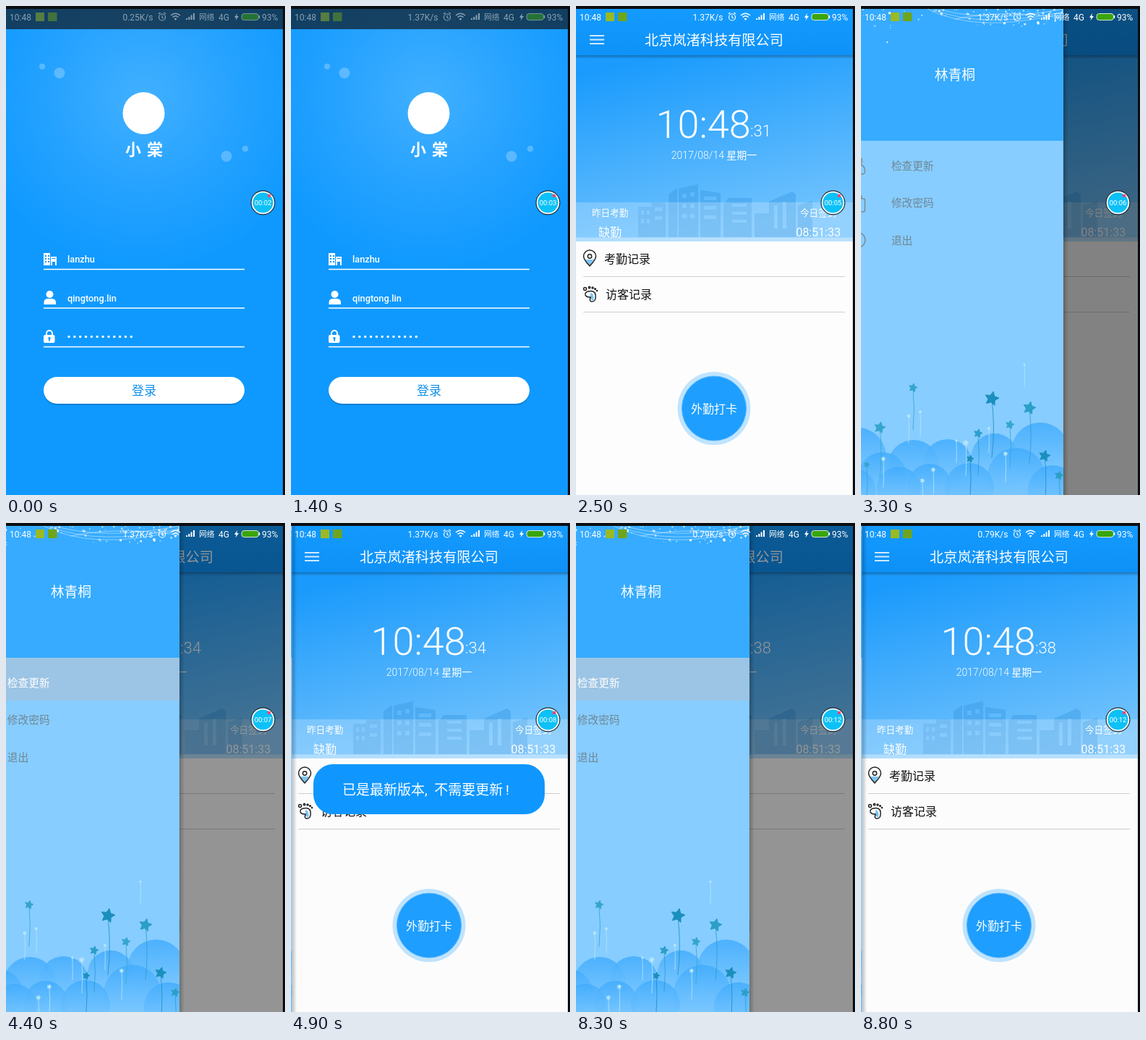
An HTML page that plays this animation: 386 by 675 pixels, repeating every 8.9 s.

```html
<!DOCTYPE html>
<html lang="zh-CN">
<head>
<meta charset="utf-8">
<title>考勤</title>
<style>
html, body { margin: 0; width: 100%; height: 100%; overflow: hidden; background: #0b0d10; }
svg { display: block; width: 386px; height: 675px; font-family: Roboto, "Noto Sans CJK SC", "Noto Sans CJK", sans-serif; fill: #fff; }
.mid { text-anchor: middle; }
.end { text-anchor: end; }
.line { fill: none; stroke: #fff; }
.icon { fill: none; stroke: #7b8d9b; stroke-width: 1.5; }
.dark { fill: none; stroke: #222; stroke-width: 1.5; }
</style>
</head>
<body>
<svg viewBox="0 0 386 675">
  <defs>
    <clipPath id="screen"><path d="M0 4H383V675H0z"/></clipPath>
    <clipPath id="panel"><path d="M0 0H300V675H0z"/></clipPath>
    <radialGradient id="glow" gradientUnits="userSpaceOnUse" cx="190" cy="125" r="240">
      <stop stop-color="#41b0ff"/><stop offset=".5" stop-color="#27a3ff"/><stop offset="1" stop-color="#0f99ff"/>
    </radialGradient>
    <linearGradient id="sky" gradientUnits="userSpaceOnUse" x1="150" y1="60" x2="210" y2="325">
      <stop stop-color="#1a9bfd"/><stop offset="1" stop-color="#74c4fd"/>
    </linearGradient>
    <linearGradient id="bar" x2="0" y2="1">
      <stop stop-color="#149bff"/><stop offset="1" stop-color="#0e92f8"/>
    </linearGradient>
    <linearGradient id="cloud" x2="0" y2="1">
      <stop stop-color="#42acfd"/><stop offset="1" stop-color="#82cbff"/>
    </linearGradient>
    <linearGradient id="edge">
      <stop stop-opacity=".25"/><stop offset="1" stop-opacity="0"/>
    </linearGradient>
    <linearGradient id="under" x2="0" y2="1">
      <stop stop-opacity=".28"/><stop offset="1" stop-opacity="0"/>
    </linearGradient>
  </defs>

  <g clip-path="url(#screen)">
    <g id="login">
      <path d="M0 0H383V675H0z" fill="url(#glow)"/>
      <path d="M0 4H383V32H0z" fill="#10202e" opacity=".75"/>
      <g opacity=".25">
        <circle cx="50" cy="83.5" r="4"/><circle cx="74" cy="92.5" r="7.5"/>
        <circle cx="305" cy="207.5" r="7.5"/><circle cx="331" cy="197" r="4.3"/>
      </g>
      <circle cx="190.5" cy="148" r="29"/>
      <text x="165" y="206" font-size="22" font-weight="700" letter-spacing="8">小棠</text>

      <path fill-rule="evenodd" d="M52 341h9v17h-9zM54 344v2h2v-2zM58 344v2h2v-2zM54 348v2h2v-2zM58 348v2h2v-2zM54 352v2h2v-2zM58 352v2h2v-2zM62 346h8v12h-2v-5h-4v5h-2zM63.500 348v1h5v-1z"/>
      <circle cx="60.500" cy="398" r="5"/><path d="M52.500 412v-3q0-5 6-5h4q6.500 0 6.500 5v3z"/>
      <path class="line" d="M56 455v-3a4 4 0 0 1 8 0v3" stroke-width="2"/>
      <rect x="52" y="454" width="15.500" height="11" rx="2"/>
      <path d="M60 457a1.700 1.700 0 0 1 1 3.100v2.400h-2v-2.400a1.700 1.700 0 0 1 1-3.100z" fill="#159bff"/>
      <path class="line" d="M52 363.500H330M52 417H330M52 470.500H330" stroke-width="1.300"/>
      <g font-size="12.800" font-weight="500">
        <text x="85" y="354">lanzhu</text><text x="85" y="408">qingtong.lin</text>
      </g>
      <path id="cursor" d="M85.500 341h1v17h-1z"/>
      <g id="dots"></g>
      <rect x="52" y="514" width="278" height="37" rx="18.500" fill="#0877c8" opacity=".75"/>
      <rect x="52" y="512" width="278" height="37" rx="18.500"/>
      <text class="mid" x="191" y="536.500" font-size="17" fill="#1090e8">登录</text>
    </g>

    <g id="home">
      <path d="M0 0H383V675H0z" fill="#fdfdfd"/>
      <path d="M0 0H383V325H0z" fill="url(#sky)"/>
      <path d="M0 4H383V68H0z" fill="url(#bar)"/>
      <path d="M0 68H383V73H0z" fill="url(#under)"/>
      <path class="line" d="M19 41H39M19 46.500H39M19 52H39" stroke-width="2" opacity=".8"/>
      <text class="mid" x="191" y="54" font-size="19.200">北京岚渚科技有限公司</text>
      <text x="110.500" y="182" font-size="54" font-weight="300">10:48</text>
      <text id="seconds" x="241" y="180" font-size="22" font-weight="300"></text>
      <text class="mid" x="191" y="211" font-size="14" font-weight="300">2017/08/14 星期一</text>

      <g fill="#3a9ce6" opacity=".45">
        <path fill-rule="evenodd" d="M86 319V277h18v-6h20v48zM90 282v6h4v-6zM98 282v6h4v-6zM90 294v6h4v-6zM98 294v6h4v-6zM109 278v5h10v-5zM109 290v5h10v-5z"/>
        <path fill-rule="evenodd" d="M128 319V260l12-9v68zM142 319V252l27-6v73zM147 259v6h6v-6zM158 257v6h6v-6zM147 273v6h6v-6zM158 273v6h6v-6zM147 287v6h6v-6zM158 287v6h6v-6z"/>
        <path fill-rule="evenodd" d="M172 319V254l28 4v61zM177 263v5h17v-5zM177 276v5h17v-5zM177 289v5h17v-5z"/>
        <path fill-rule="evenodd" d="M204 319V274l7-9h32v54zM216 273v4h20v-4zM216 284v4h20v-4zM216 295v4h20v-4z"/>
        <path fill-rule="evenodd" d="M247 319V286h20v-16l32-14 5 4v59zM274 275v32h5v-32zM286 270v37h5v-37z"/>
        <path d="M307 319V275l20-6v50z"/>
      </g>
      <path d="M0 271H383V325H0z" opacity=".22"/>
      <path d="M0 319.500H383V325H0z" opacity=".35"/>
      <g font-size="12.600"><text x="22" y="290">昨日考勤</text><text x="310" y="290">今日签到</text></g>
      <g font-size="16"><text x="31" y="318">缺勤</text><text x="304.500" y="318">08:51:33</text></g>

      <path d="M12 350h13l-6.500 9z" fill="#7cc5f4"/>
      <path class="dark" d="M19 359Q10.500 350 10.500 345.500a8.500 8.500 0 0 1 17 0Q27.500 350 19 359z"/>
      <circle class="dark" cx="19" cy="345.500" r="2.700"/>
      <path d="M20 396q6 1 4 11l-4-3z" fill="#7cc5f4"/>
      <path class="dark" d="M17 394q9-2 10 5 1 9-5 9-4 0-2-6-6 0-7-3-1-4 4-5z"/>
      <g class="dark"><circle cx="12.500" cy="390.500" r="2"/><circle cx="18.500" cy="388.500" r="1.200"/><circle cx="23" cy="389" r="1"/><circle cx="26.500" cy="390.500" r=".8"/><circle cx="29" cy="393" r=".6"/></g>
      <g font-size="16" fill="#111"><text x="39" y="355">考勤记录</text><text x="41" y="404">访客记录</text></g>
      <path d="M10 373.500H372M10 422.500H372" stroke="#cfcfcf"/>
      <circle cx="191" cy="555.500" r="50.500" fill="#c0e4fe"/>
      <circle cx="191" cy="555.500" r="44.500" fill="#1e9fff" stroke="#4db2ff"/>
      <text class="mid" x="191" y="561.500" font-size="16">外勤打卡</text>
    </g>

    <path id="scrim" d="M0 4H383V675H0z" fill="#000"/>

    <g id="drawer">
      <path d="M300 0h7V675h-7z" fill="url(#edge)"/>
      <path d="M0 0H300V675H0z" fill="#87cdff"/>
      <path d="M0 0H300V186H0z" fill="#36abff"/>
      <g id="notes" clip-path="url(#panel)">
        <path class="line" d="M120 5Q190 32 300 8M130 5Q200 24 300 4M150 18Q220 4 300 17M112 4Q180 38 290 12" stroke-width=".8" opacity=".55"/>
      </g>
      <text class="mid" x="150" y="102" font-size="18.800">林青桐</text>
      <path id="selected" d="M0 186H300V245H0z" fill="#9cc4e4"/>
      <g class="icon">
        <circle cx="16" cy="214" r="5.500"/><path d="M12 219q-6 3-5.500 9 0 4 4 4h11q4 0 4-4 .5-6-5.500-9"/>
        <rect x="6.500" y="266" width="19" height="18" rx="2"/><path d="M11 266v-2a5 4 0 0 1 10 0v2"/>
        <circle cx="16" cy="323" r="10"/><path d="M16 317v6"/>
      </g>
      <g font-size="14.700" fill="#6f8796">
        <text id="update" x="62" y="225.500">检查更新</text><text x="62" y="276.500">修改密码</text><text x="62" y="328.500">退出</text>
      </g>
      <g id="garden" clip-path="url(#panel)"></g>
    </g>

    <g id="toast">
      <rect x="31" width="320" height="69" rx="27" fill="#0f97ff"/>
      <text x="71" y="42" font-size="19">已是最新版本,&#160;&#160;不需要更新&#8201;!</text>
    </g>

    <g id="status" font-size="12">
      <text x="5" y="19.500">10:48</text>
      <path d="M41 9h12v12h-12z" fill="#9aba22"/><path d="M58 9h12.500v12h-12.500z" fill="#6fa51c"/>
      <text id="speed" class="end" x="203.500" y="19.500"></text>
      <g class="line" stroke-width="1.200">
        <circle cx="216" cy="15.500" r="4.500"/><path d="M216 13v3l2 1M211 11l2.500-2M221 11l-2.500-2"/>
        <path d="M228 13q6.500-5.500 13 0M230.500 15.500q4-3.500 8 0" stroke-width="1.600"/>
      </g>
      <path d="M232.500 17.500q2-1.500 4 0l-2 2.500zM249 17h2v2h-2zM252.300 15h2v4h-2zM255.600 12.500h2v6.500h-2zM259 10h2v9h-2z"/>
      <text x="267" y="19" font-size="10.700">网络</text><text x="294" y="19.500">4G</text>
      <path d="M320 10l-4 6h2.500l-1 4 4.500-6h-2.700z"/>
      <rect x="326" y="10.500" width="23.500" height="9" rx="3.500" fill="#3aa50c" stroke="#fff" stroke-width=".8"/><path d="M350 13h1.200v4h-1.200z"/>
      <text x="354" y="19.500">93%</text>
    </g>

    <circle cx="355.500" cy="271.500" r="17" fill="#1c2b3a"/>
    <circle cx="355.500" cy="271.500" r="15.800"/>
    <circle cx="355.500" cy="271.500" r="14" fill="#0cc1f7"/>
    <circle cx="364" cy="262" r="2.300" fill="#f4437c"/>
    <text id="timer" class="mid" x="355.500" y="275" font-size="9.500"></text>
  </g>
</svg>
<script>
const LOOP = 8900, STEP = 100, DRAWER = 300;
const el = id => document.getElementById(id);
const clamp = v => Math.max(0, Math.min(1, v));
const settle = (t, start, length) => 1 - (1 - clamp((t - start) / length)) ** 5;
const move = (id, x, y) => el(id).setAttribute('transform', `translate(${x} ${y})`);
const show = (id, alpha) => el(id).setAttribute('opacity', alpha);
// Counts how many of the given moments have passed.
const passed = (t, moments) => moments.filter(m => t >= m).length;

let seed = 7;
const random = () => (seed = seed * 16807 % 2147483647) / 2147483647;
const circle = (x, y, r, extra = '') => `<circle cx="${x}" cy="${y}" r="${r}" ${extra}/>`;

function star(x, y, r, color) {
  const points = Array.from({ length: 10 }, (_, i) => {
    const a = i * Math.PI / 5 - 1.35, d = i % 2 ? r * .5 : r;
    return `${(x + d * Math.cos(a)).toFixed(1)},${(y + d * Math.sin(a)).toFixed(1)}`;
  });
  const length = 22 + r * 6;
  return `<path d="M${x} ${y}q${r / 2} ${length / 2} 0 ${length}" fill="none" stroke="${color}" stroke-width=".8"/>
    <polygon points="${points.join(' ')}" fill="${color}" stroke="${color}" stroke-linejoin="round"/>`;
}

function buildScenery() {
  el('dots').innerHTML = Array.from({ length: 12 }, (_, i) => circle(87 + i * 7.85, 456.5, 1.7)).join('');

  let notes = '';
  for (let i = 0; i < 70; i++) {
    const x = random() * 300, y = 5 + random() ** 2 * (x > 110 ? 24 : 48);
    notes += circle(x, y, .5 + random() * 1.3, `opacity="${.35 + random() * .6}"`);
  }
  el('notes').innerHTML += notes;

  const clouds = [[15, 622, 40], [93, 635, 36], [140, 632, 34], [268, 615, 40], [205, 622, 32],
    [50, 650, 34], [235, 650, 40], [115, 662, 30], [170, 665, 34], [285, 668, 34], [10, 668, 30], [72, 666, 30]];
  const tall = [[92, 527, 6], [201, 542, 10], [253, 555, 9], [46, 582, 8], [274, 621, 8], [182, 590, 6],
    [226, 578, 6], [171, 625, 5], [294, 648, 6], [28, 633, 4]];
  const pale = [[86, 566, 2.5], [51, 625, 3], [120, 640, 3], [197, 583, 2], [165, 603, 4], [152, 600, 1.5],
    [102, 560, 2], [220, 618, 3], [246, 495, 1.5], [105, 655, 3]];
  el('garden').innerHTML =
    clouds.map(([x, y, r]) => circle(x, y, r, 'fill="url(#cloud)" opacity=".85"')).join('') +
    tall.map(([x, y, r], i) => star(x, y, r, ['#35a5cf', '#1b8fbd', '#2b9fc9'][i % 3])).join('') +
    pale.map(([x, y, r]) => star(x, y, r, '#b5e6f8')).join('');
}

function draw(t) {
  const loggedIn = t >= 2000;
  const enter = 1 - (1 - clamp((t - 1900) / 600)) ** 3;
  move('home', 383 * (1 - enter), 0);
  move('login', -100 * enter, 0);
  show('cursor', t >= 1900 || t >= 1000 && t < 1400 ? .8 : 0);

  const open = settle(t, 2945, 850) - settle(t, 4365, 800) + settle(t, 6540, 600) - settle(t, 8265, 800);
  move('drawer', open > .001 ? DRAWER * (open - 1) : -DRAWER - 20, 0);
  show('scrim', .52 * open);
  show('selected', t >= 4200 ? 1 : 0);
  el('update').setAttribute('fill', t >= 4200 ? '#fff' : '#6f8796');

  move('toast', 0, 340 - 60 * (1 - clamp((t - 4500) / 800)) ** 3.1);
  show('toast', clamp((t - 4500) / 300) * clamp((6800 - t) / 300));

  show('status', loggedIn ? 1 : .5);
  el('speed').textContent = ['0.25', '1.37', '0.79'][passed(t, [1400, 6000])] + 'K/s';
  el('seconds').textContent = ':' + (31 + passed(t, [2900, 3500, 4400, 5200, 6000, 7200, 7900]));
  const elapsed = 2 + passed(t, [1000, 1500, 1900, 2900, 4200, 4600, 6000, 6400, 7200, 7900]);
  el('timer').textContent = '00:' + String(elapsed).padStart(2, '0');
}

function frame() {
  draw(Math.floor(performance.now() % LOOP / STEP) * STEP);
  requestAnimationFrame(frame);
}

buildScenery();
frame();
</script>
</body>
</html>
```
